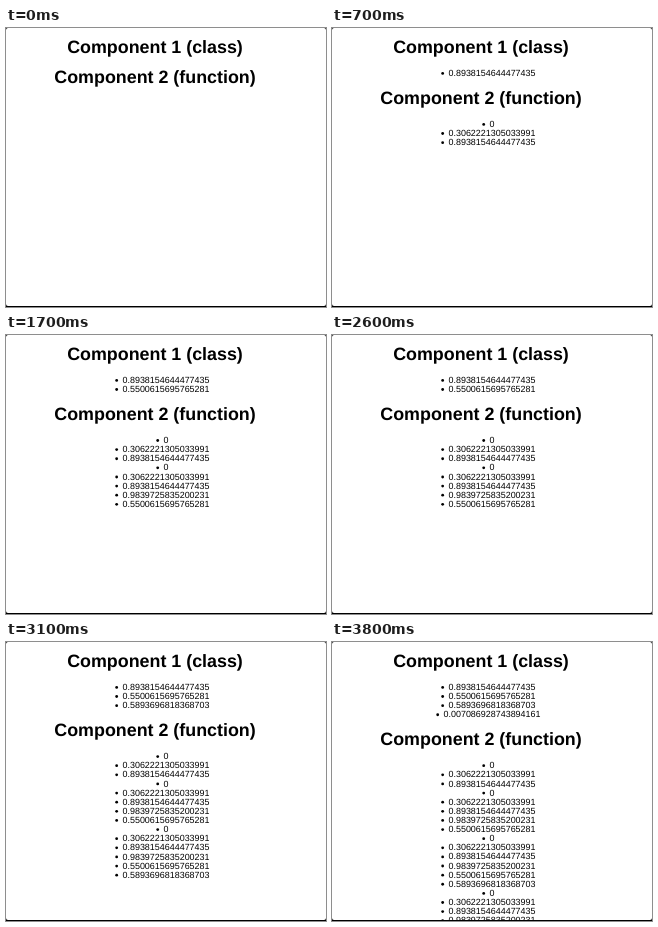
Recreate the animation shown at these times as an HTML page. Size 320 px wide and 279 px high, loop 4.1 s.

```html
<!DOCTYPE html>
<html lang="en">
<head>
<meta charset="utf-8">
<title>Two components</title>
<style>
html, body { margin: 0; width: 100%; height: 100%; overflow: hidden; background: #000; }
svg { display: block; width: 320px; height: 279px; }
text {
  font: 8.95px "Liberation Sans", Arial, sans-serif;
  text-anchor: middle;
  text-rendering: geometricPrecision;
}
.title { font-size: 17.87px; font-weight: bold; }

/* One tick per second, at 0.7, 1.7, 2.7 and 3.7 s */
.tick1, .tick2, .tick3, .tick4, #second { animation: 4.1s step-end infinite; }
.tick1 { animation-name: show1; }
.tick2 { animation-name: show2; }
.tick3 { animation-name: show3; }
.tick4 { animation-name: show4; }
#second { animation-name: push; }
@keyframes show1 { 0% { visibility: hidden; } 17.07%, 100% { visibility: visible; } }
@keyframes show2 { 0% { visibility: hidden; } 41.46%, 100% { visibility: visible; } }
@keyframes show3 { 0% { visibility: hidden; } 65.85%, 100% { visibility: visible; } }
@keyframes show4 { 0% { visibility: hidden; } 90.24%, 100% { visibility: visible; } }
@keyframes push {
  0% { transform: translateY(30px); }
  17.07% { transform: translateY(51px); }
  41.46% { transform: translateY(60.1px); }
  65.85% { transform: translateY(69.2px); }
  90.24%, 100% { transform: translateY(78.3px); }
}
</style>
</head>
<body>
<svg viewBox="0 0 320 279">
  <rect width="320" height="278" rx="2" fill="#fff"/>
  <svg width="320" height="278">
    <g id="first"><text class="title" x="149" y="25">Component 1 (class)</text></g>
    <g id="second"><text class="title" x="149" y="25">Component 2 (function)</text></g>
  </svg>
</svg>
<script>
const LINE = 9.12, CENTER = 160;
const classValues = ["0.8938154644477435", "0.5500615695765281", "0.5893696818368703", "0.007086928743894161"];
const [a, b, c, d] = classValues;
const base = ["0", "0.3062221305033991", a];
const extra = "0.9839725835200231";
const batches = [base, [...base, extra, b], [...base, extra, b, c], [...base, extra, b, c, d]];

function add(parent, tag, attrs, text = "") {
  const el = document.createElementNS("http://www.w3.org/2000/svg", tag);
  for (const key in attrs) el.setAttribute(key, attrs[key]);
  el.textContent = text;
  parent.append(el);
  return el;
}

function addItem(list, row, tick, value) {
  const y = 48 + row * LINE;
  const dots = value.includes(".") ? 1 : 0;
  const width = 8.95 * (0.556 * (value.length - dots) + 0.278 * dots);
  const item = add(list, "g", { class: "tick" + tick });
  add(item, "circle", { cx: CENTER - width / 2 - 5.8, cy: y - 2.6, r: 1.4 });
  add(item, "text", { x: CENTER, y }, value);
}

const first = document.getElementById("first");
const second = document.getElementById("second");
classValues.forEach((value, i) => addItem(first, i, i + 1, value));
let row = 0;
batches.forEach((batch, i) => batch.forEach(value => addItem(second, row++, i + 1, value)));
</script>
</body>
</html>
```
